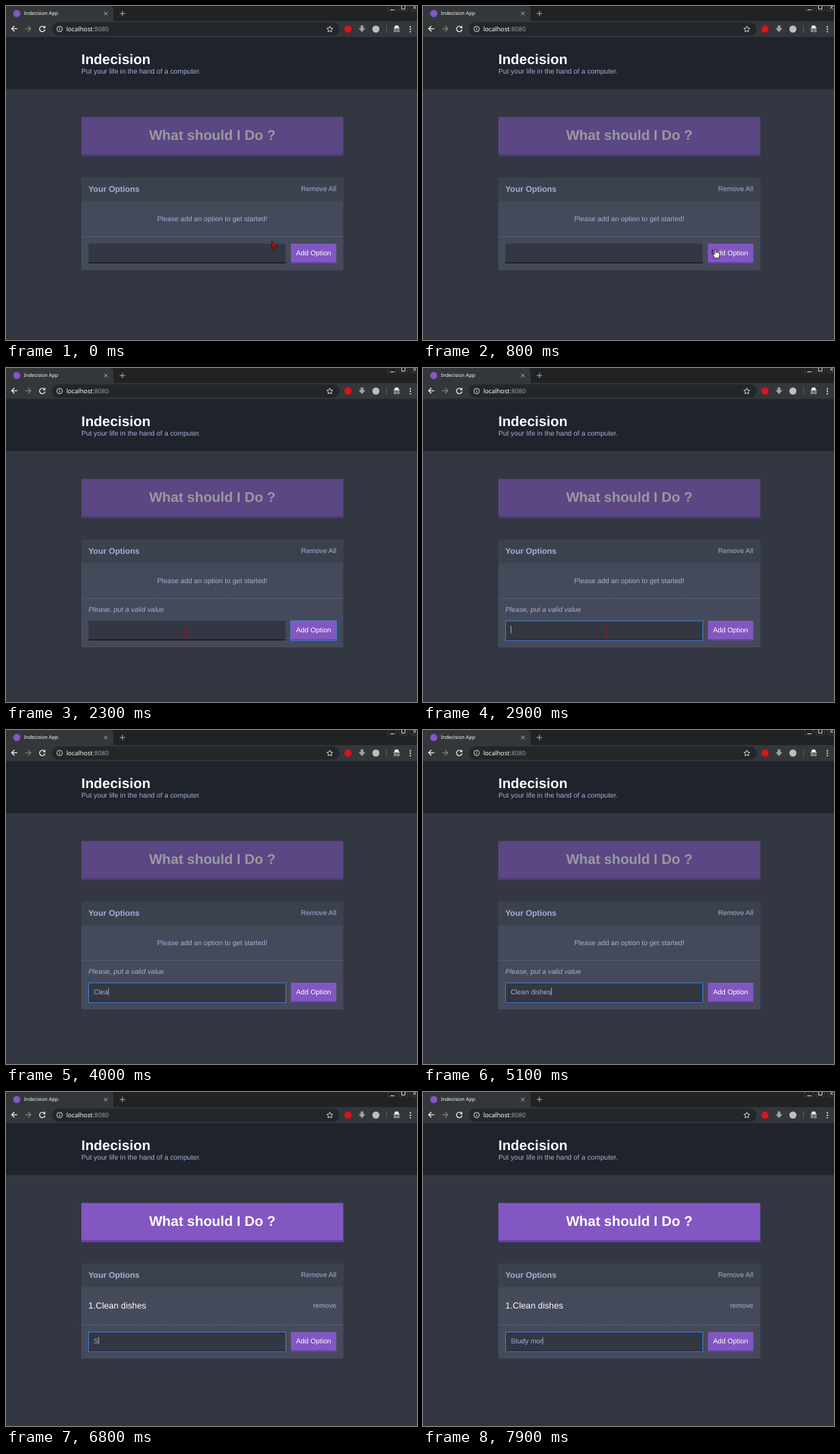
These frames come from a looping animation (600x489 px, 8 s). An HTML page:

```html
<!DOCTYPE html>
<html lang="en">
<head>
<meta charset="utf-8">
<title>Indecision App</title>
<style>
  html, body { margin: 0; width: 100%; height: 100%; overflow: hidden; background: #323742; }
  svg { display: block; width: 100%; height: 100%; }
  text { font: 10.2px "Liberation Sans", Arial, sans-serif; fill: #a5afd7; white-space: pre; text-rendering: geometricPrecision; }
  .ui { font-family: "Noto Sans", sans-serif; }
  .bold { font-weight: bold; }
  .big { font-size: 20.4px; }
  .white { fill: #fff; }
  .end { text-anchor: end; }
  .mid { text-anchor: middle; }
  .ico { fill: none; stroke: #f1f3f4; stroke-width: 1.3; }
  .thin { stroke-width: .9; }
  .ring { fill: none; stroke: #3f7fe0; }
</style>
</head>
<body>
<svg viewBox="0 0 600 489">
  <rect width="600" height="489" fill="#323742"/>

  <!-- browser bar -->
  <rect width="600" height="23" fill="#202223"/>
  <path d="M0 0H152Q157 0 157 6V22H0Z" fill="#33373a"/>
  <rect y="22" width="600" height="24" fill="#33373a"/>
  <rect x="67" y="24" width="420" height="19.5" rx="9.7" fill="#232729"/>
  <circle cx="15.7" cy="11" r="5.2" fill="#8357c5"/>
  <text class="ui white" x="26" y="13.4" style="font-size:7.2px">Indecision App</text>
  <g class="ico thin">
    <path d="M143.2 8.5l5 5m0-5l-5 5" stroke="#c6c8ca"/>
    <path d="M166 11h8m-4-4v8" stroke="#c6c8ca"/>
    <path d="M561 5.5h6M577.5 0V4.5h5V0M594.5 0l4 4.5m0-4.5l-4 4.5"/>
    <path d="M557.5 0v7h12V0M574 0v7h12V0M590.5 0v7H600" stroke="#484b4d" stroke-width=".7"/>
  </g>
  <g class="ico">
    <path d="M16.5 33.3H8.5M12.3 29.3l-4 4 4 4"/>
    <path d="M28 33.3h8M32.2 29.3l4 4-4 4" stroke="#7d8184"/>
    <path d="M56.2 31.2A4 4 0 1 0 56.9 34.5"/>
    <path d="M57.4 28.6v3.8h-3.8z" fill="#f1f3f4" stroke="none"/>
    <circle class="thin" cx="78.3" cy="33.7" r="4"/>
    <path class="thin" d="M78.3 33v2.8M78.3 31.2v1"/>
    <path class="thin" d="M472.7 29.6l1.3 2.7 3 .4-2.2 2.1.5 3-2.6-1.4-2.6 1.4.5-3-2.2-2.1 3-.4z"/>
  </g>
  <text class="ui white" x="88" y="37" style="font-size:9.14px">localhost<tspan fill="#9aa0a6">:8080</tspan></text>
  <circle cx="499.3" cy="33.7" r="5.3" fill="#d9141c"/>
  <path d="M517.7 28.5h4v4h3l-5 5.8-5-5.8h3z" fill="#a0a3a6"/>
  <circle cx="540" cy="33.7" r="5.2" fill="#bcbec0"/>
  <path d="M555.5 28.5v10" stroke="#5b5f62"/>
  <g class="ico thin">
    <path d="M565.5 33h9.6"/>
    <path d="M567.3 32l1-3h4l1 3z" fill="#f1f3f4"/>
    <circle cx="568" cy="36.4" r="1.5"/><circle cx="572.6" cy="36.4" r="1.5"/>
  </g>
  <path d="M590.3 29.6v9" stroke="#f1f3f4" stroke-width="1.8" stroke-dasharray="1.8"/>

  <!-- page -->
  <rect y="45.5" width="600" height="76" fill="#1f232b"/>
  <text class="bold big white" x="110" y="84.6">Indecision</text>
  <text x="110" y="98.8">Put your life in the hand of a computer.</text>

  <rect id="pick" x="110" y="162.5" width="382.4" height="57.5"/>
  <rect id="pickEdge" x="110" y="216.8" width="382.4" height="3.2"/>
  <text id="pickText" class="bold big mid" x="301.2" y="196">What should I Do ?</text>

  <rect id="panel" x="110" y="251" width="382.4" fill="#454a5b"/>
  <rect x="110" y="251" width="382.4" height="34.5" fill="#3c424d"/>
  <text class="bold" x="120.3" y="272" style="font-size:11.93px">Your Options</text>
  <text class="end" x="482.2" y="271.3">Remove All</text>

  <text id="empty" class="mid" x="301.2" y="314.6">Please add an option to get started!</text>
  <g id="item">
    <text class="white" x="120.3" y="317.3" style="font-size:12.75px">1.Clean dishes</text>
    <text class="end" x="482.2" y="316.4">remove</text>
  </g>
  <path id="rule" d="M110 0H492.4" stroke="#676c80" stroke-width=".8" stroke-dasharray="2 1"/>
  <text id="error" x="120.3" y="357" font-style="italic" style="font-style:italic">Please, put a valid value</text>

  <g id="form">
    <rect x="120.4" width="287.8" height="29" fill="#323742"/>
    <rect x="120.4" y="27" width="287.8" height="2" fill="#1f222a"/>
    <rect id="inputRing" class="ring" x="120.5" y=".2" width="288" height="28.6"/>
    <text id="typed" x="128" y="17"></text>
    <path id="caret" d="M.5 7.5v11" stroke="#c3c9e4" stroke-width=".8"/>
    <rect x="416" width="66.2" height="29" fill="#8357c1"/>
    <rect x="416" y="27" width="66.2" height="2" fill="#6b3cab"/>
    <rect id="buttonRing" class="ring" x="415.6" y=".1" width="66.9" height="28.8"/>
    <text class="white mid" x="449" y="17">Add Option</text>
  </g>

  <g id="cursor">
    <path id="arrow" d="M0 0V11.5L2.6 9.2 4.6 13.6 6.6 12.6 4.6 8.5H8.2Z" fill="#a31515" stroke="#2a1216" stroke-width=".8"/>
    <path id="hand" d="M-1 0Q0-.9 1 0V4.2L5 5Q6.2 5.4 6 7L5 12.6H-2L-5-.1 -5 6Q-4.6 4.8-3.2 5.6L-1 7.2Z" fill="#fff" stroke="#15161a" stroke-width=".9"/>
    <path id="beam" d="M-3.2-7H-.8L0-6.2.8-7H3.2M0-6.2V6.2M-3.2 7H-.8L0 6.2.8 7H3.2" fill="none" stroke="#97152a" stroke-width="1.6"/>
  </g>
</svg>
<script>
const LOOP = 8000, STEP = 100;
const el = {};
document.querySelectorAll('[id]').forEach(n => el[n.id] = n);

// when each letter is typed
const first = { text: 'Clean dishes', at: [3300, 3700, 3800, 4000, 4100, 4300, 4500, 4700, 4800, 4900, 5000, 5100] };
const second = { text: 'Study mor', at: [6800, 7100, 7200, 7300, 7400, 7600, 7800, 7800, 7900] };

const show = (node, on) => node.setAttribute('display', on ? 'inline' : 'none');
const set = (node, name, value) => node.setAttribute(name, value);
const part = (t, from, to) => Math.min(1, Math.max(0, (t - from) / (to - from)));
const typedAt = (word, t) => word.text.slice(0, word.at.filter(a => a <= t).length);

function pointer(t) {
  const a = part(t, 0, 900), b = part(t, 1900, 2300);
  const nudge = t >= 2900 ? 1 : 0;
  return [388 + 44 * a - 168 * b + 3 * nudge, 344 + 14 * a + 29 * b + nudge];
}

function drawCursor(t, top) {
  const [x, y] = pointer(t);
  const inRow = y >= top && y <= top + 29;
  const kind = inRow && x > 416 || t >= 1600 && t < 1800 ? 'hand'
    : inRow && x < 408 ? 'beam' : 'arrow';
  for (const k of ['arrow', 'hand', 'beam']) show(el[k], k === kind);
  set(el.cursor, 'transform', `translate(${x} ${y})`);
  show(el.cursor, t < 4000);
}

function draw(time) {
  const t = Math.floor(time / STEP) * STEP;
  const added = t >= 5300;
  const error = t >= 1700 && !added;
  const focus = t >= 2700;
  const top = added ? 351.2 : error ? 370 : 348;

  set(el.pick, 'fill', added ? '#8357c1' : '#5b4783');
  set(el.pickEdge, 'fill', added ? '#6b3cab' : '#4e3978');
  set(el.pickText, 'style', `fill:${added ? '#fff' : '#999a9e'}`);
  set(el.panel, 'height', top + 39 - 251);
  set(el.rule, 'transform', `translate(0 ${added ? 341 : 337.6})`);
  set(el.form, 'transform', `translate(0 ${top})`);
  show(el.empty, !added);
  show(el.item, added);
  show(el.error, error);
  show(el.inputRing, focus);
  show(el.buttonRing, t >= 1600 && !focus);

  el.typed.textContent = typedAt(added ? second : first, t);
  const end = 128 + (el.typed.textContent ? el.typed.getComputedTextLength() : 0);
  set(el.caret, 'transform', `translate(${end} 0)`);
  show(el.caret, focus && !(t >= 5900 && t < 6500));

  drawCursor(t, top);
}

const start = performance.now();
function tick() {
  draw((performance.now() - start) % LOOP);
  requestAnimationFrame(tick);
}
tick();
</script>
</body>
</html>
```
